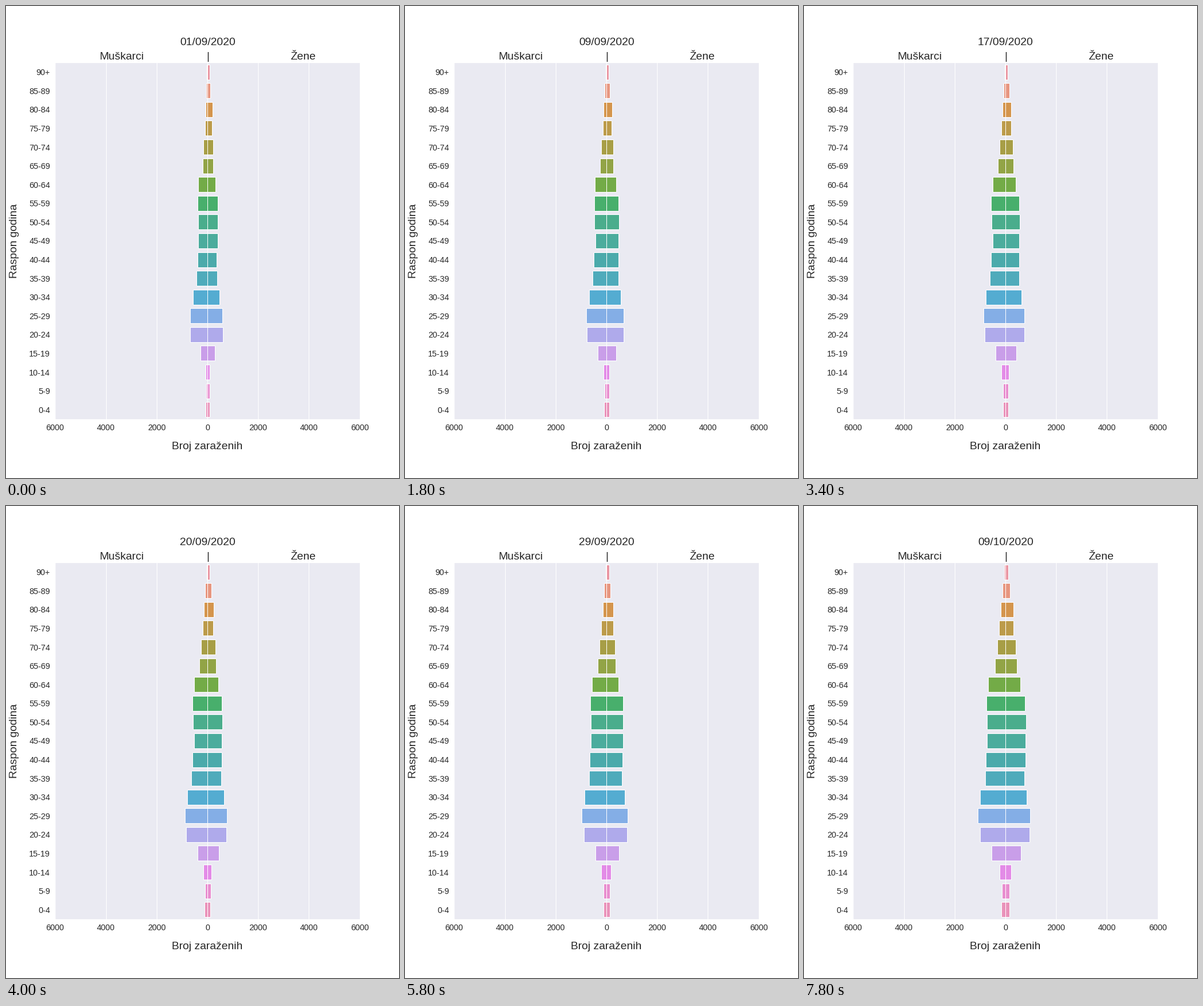
A matplotlib script that plays this animation: 683 by 820 pixels, repeating every 8000 ms.

```python
import colorsys

import matplotlib.pyplot as plt
import numpy as np
from matplotlib.animation import FuncAnimation

W, H, DPI = 683, 820, 64
PX = 72 / DPI  # points per pixel
INK = "#262626"
FRAMES, INTERVAL = 40, 200

plt.rcParams["font.family"] = "Liberation Sans"

AGES = ["90+"] + [f"{a}-{a + 4}" for a in range(85, -1, -5)]

# Cumulative cases per age group at four dates, oldest group first.
MEN = np.array([
    [25, 57, 75, 102, 170, 193, 363, 397, 363, 363, 397, 442, 578, 691, 691, 283, 79, 57, 68],
    [27, 68, 113, 147, 215, 261, 476, 510, 499, 453, 521, 567, 714, 816, 793, 351, 136, 79, 91],
    [30, 86, 136, 193, 261, 329, 544, 612, 589, 567, 612, 657, 816, 929, 861, 408, 181, 113, 113],
    [41, 113, 181, 261, 329, 408, 680, 759, 737, 737, 782, 805, 997, 1100, 1009, 544, 238, 136, 159],
])
WOMEN = np.array([
    [91, 120, 211, 181, 227, 227, 317, 408, 408, 408, 363, 385, 465, 578, 601, 295, 79, 79, 91],
    [95, 136, 227, 204, 272, 295, 397, 499, 521, 499, 499, 499, 589, 703, 703, 397, 120, 109, 113],
    [102, 159, 249, 249, 329, 351, 442, 612, 612, 612, 601, 578, 680, 805, 782, 465, 159, 136, 125],
    [118, 181, 317, 317, 397, 442, 578, 759, 805, 782, 782, 748, 827, 975, 941, 612, 227, 159, 147],
])

# Overall growth of the epidemic by day, from 0 to 1.
GROWTH_DAYS = [0, 5, 11, 16, 23, 33, 38]
GROWTH = [0, 0.19, 0.33, 0.44, 0.57, 0.77, 1]
KEY_GROWTH = [0, 0.33, 0.57, 1]

XYZ_TO_RGB = np.array([
    [3.2406, -1.5372, -0.4986],
    [-0.9689, 1.8758, 0.0415],
    [0.0557, -0.2040, 1.0570],
])


def lch_to_linear(light, chroma, hue):
    u = chroma * np.cos(hue) / (13 * light) + 0.19784
    v = chroma * np.sin(hue) / (13 * light) + 0.46834
    y = ((light + 16) / 116) ** 3
    return XYZ_TO_RGB @ [9 * y * u / (4 * v), y, y * (12 - 3 * u - 20 * v) / (4 * v)]


def husl(hue, sat, light):
    """HUSL colour as sRGB; the gamut edge is found by bisection."""
    lo, hi = 0.0, 200.0
    for _ in range(40):
        mid = (lo + hi) / 2
        rgb = lch_to_linear(light, mid, hue)
        if rgb.min() >= 0 and rgb.max() <= 1:
            lo = mid
        else:
            hi = mid
    rgb = np.clip(lch_to_linear(light, lo * sat, hue), 0, 1)
    return np.where(rgb <= 0.0031308, 12.92 * rgb, 1.055 * rgb ** (1 / 2.4) - 0.055)


def bar_color(i):
    hue = np.radians((i / len(AGES) + 0.01) % 1 * 359)
    h, l, s = colorsys.rgb_to_hls(*husl(hue, 0.891, 69.3))
    return colorsys.hls_to_rgb(h, l, s * 0.75)


def cases(table, day):
    g = np.interp(day, GROWTH_DAYS, GROWTH)
    return [np.interp(g, KEY_GROWTH, column) for column in table.T]


fig = plt.figure(figsize=(W / DPI, H / DPI), dpi=DPI, facecolor="white")
ax = fig.add_axes([0.125, 0.125, 0.775, 0.755], facecolor="#eaeaf2")
ax.set_xlim(-6000, 6000)
ax.set_ylim(len(AGES) - 0.5, -0.5)
ax.set_axisbelow(True)
ax.grid(axis="x", color="white", lw=1 * PX)
for spine in ax.spines.values():
    spine.set(color="white", lw=1.2 * PX)

ticks = range(-6000, 6001, 2000)
ax.set_xticks(ticks, [str(abs(t)) for t in ticks])
ax.set_yticks(range(len(AGES)), AGES)
ax.tick_params(length=0, pad=8.6 * PX, labelsize=14.3 * PX, labelcolor=INK)


def label(x, y, text, **kw):
    style = dict(ha="center", va="baseline", size=19.2 * PX, color=INK)
    return fig.text(x / W, 1 - y / H, text, **{**style, **kw})


date = label(350.3, 67.5, "")
label(201.3, 93, "Muškarci")
label(351, 93, "|")
label(516, 93, "Žene")
label(350, 770.5, "Broj zaraženih")
label(14.8, 408.5, "Raspon godina", rotation=90, va="center")

colors = [bar_color(i) for i in range(len(AGES))]
bar_style = dict(height=0.8, color=colors, edgecolor="white", lw=1 * PX)
men = ax.barh(range(len(AGES)), 0, **bar_style)
women = ax.barh(range(len(AGES)), 0, **bar_style)
ax.set_xlim(-6000, 6000)
ax.set_ylim(len(AGES) - 0.5, -0.5)


def update(k):
    day = k - (k > 4)  # the fifth of September is held twice
    d, m = (day + 1, 9) if day < 30 else (day - 29, 10)
    date.set_text(f"{d:02d}/{m:02d}/2020")
    for bar, n in zip(men, cases(MEN, day)):
        bar.set_width(-n)
    for bar, n in zip(women, cases(WOMEN, day)):
        bar.set_width(n)
    return [date, *men, *women]


anim = FuncAnimation(fig, update, frames=FRAMES, interval=INTERVAL,
                     repeat=True, repeat_delay=0, blit=False)
plt.show()
```
